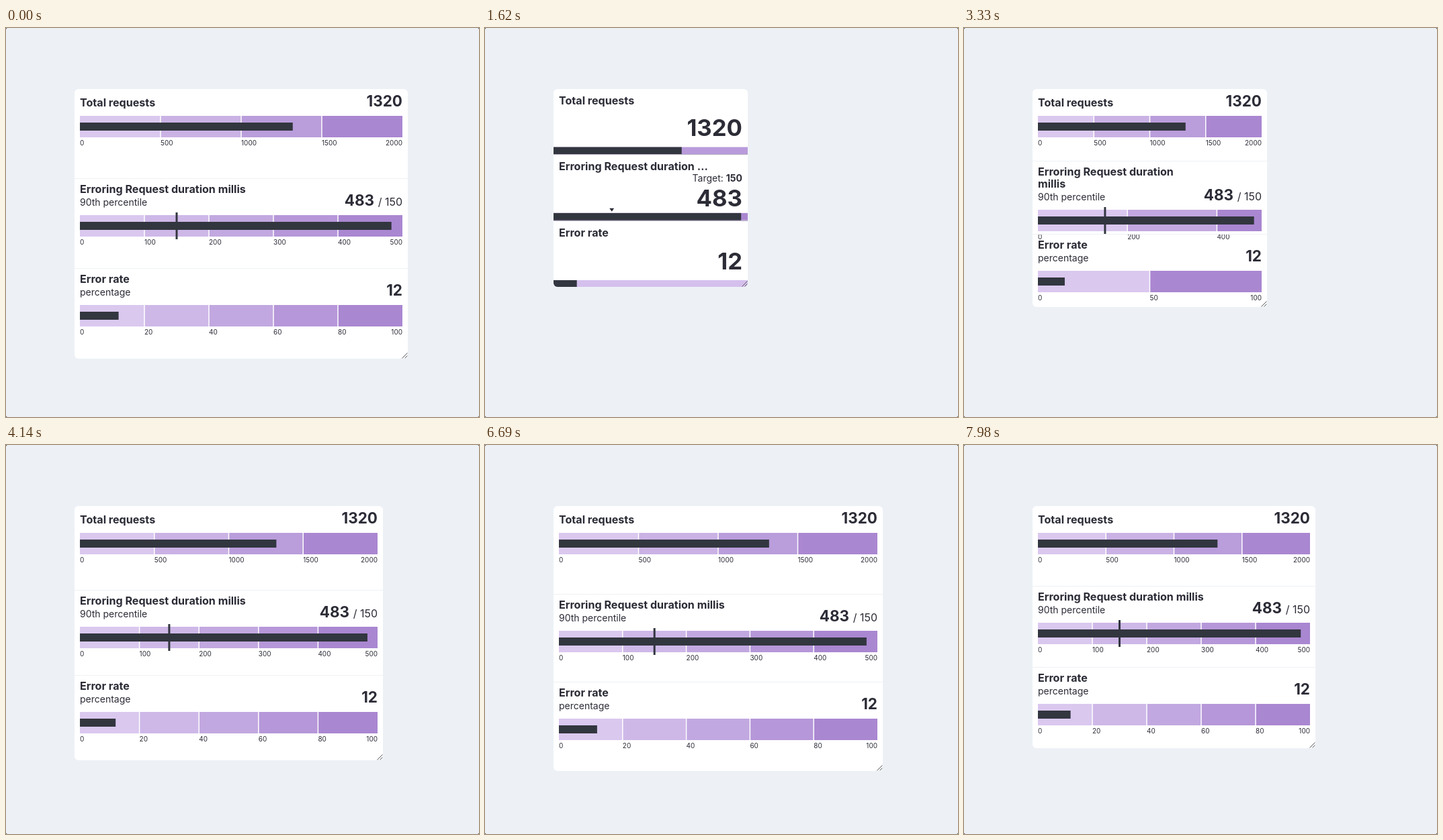
An HTML page with a canvas that plays this animation: 704 by 580 pixels, repeating every 8000 ms.

```html
<!DOCTYPE html>
<html lang="en">
<head>
<meta charset="utf-8">
<title>Resizable bullet charts</title>
<style>
  html, body { margin: 0; width: 100%; height: 100%; overflow: hidden; background: #3a3c40; }
  canvas { display: block; }
</style>
</head>
<body>
<canvas id="stage" width="704" height="580"></canvas>
<script>
const ctx = document.getElementById('stage').getContext('2d');
const LOOP = 8000, STEP = 30;
const LEFT = 102, TOP = 91, PAD = 8;
const TITLE = 16.1;
const INK = '#2b2c36', BAR = '#32363f', LIGHT = [218, 200, 239], DARK = [170, 135, 209];

// Panel corner while it is dragged: time, right, bottom
const DRAG = [
  [510, 598, 493], [1320, 437, 411], [1620, 391, 386], [2070, 364, 373],
  [2910, 364, 373], [3330, 451, 416], [3720, 513, 447], [4140, 561, 470],
  [4530, 585, 482], [4680, 592, 486], [7050, 592, 486], [7380, 578, 479],
  [7860, 534, 457], [7980, 523, 452]
];

const CHARTS = [
  { lines: ['Total requests'], value: 1320, max: 2000, rest: '#b99bdc' },
  { lines: ['Erroring Request duration', 'millis'], sub: '90th percentile',
    value: 483, target: 150, max: 500, rest: '#a987d0' },
  { lines: ['Error rate'], sub: 'percentage', value: 12, max: 100, rest: '#d5c0ed' }
];

const secant = (i, k) => (DRAG[i + 1][k] - DRAG[i][k]) / (DRAG[i + 1][0] - DRAG[i][0]);

function tangent(i, k) {
  if (i === 0) return 0;
  if (i === DRAG.length - 1) return secant(i - 1, k);
  const a = secant(i - 1, k), b = secant(i, k);
  return a * b > 0 ? 2 * a * b / (a + b) : 0;
}

// Monotone cubic interpolation between drag points
function dragAt(t, k) {
  const last = DRAG.length - 1;
  if (t <= DRAG[0][0]) return DRAG[0][k];
  if (t >= DRAG[last][0]) return DRAG[last][k];
  const i = DRAG.findIndex(p => p[0] > t) - 1;
  const span = DRAG[i + 1][0] - DRAG[i][0], u = (t - DRAG[i][0]) / span, v = 1 - u;
  return DRAG[i][k] * (1 + 2 * u) * v * v + DRAG[i + 1][k] * u * u * (3 - 2 * u)
    + span * u * v * (tangent(i, k) * v - tangent(i + 1, k) * u);
}

function rect(x, y, w, h, color) {
  ctx.fillStyle = color;
  ctx.fillRect(x, y, w, h);
}

function roundRect(x, y, w, h, r, color) {
  ctx.beginPath();
  ctx.roundRect(x, y, w, h, r);
  ctx.fillStyle = color;
  ctx.fill();
}

// Draws text and returns its width
function text(str, x, y, size, weight = 400, align = 'left') {
  ctx.font = `${weight} ${size}px Inter, sans-serif`;
  ctx.textAlign = align;
  ctx.fillStyle = INK;
  ctx.fillText(str, x, y);
  return ctx.measureText(str).width;
}

function tickStep(max, count) {
  const raw = max / count, power = 10 ** Math.floor(Math.log10(raw)), error = raw / power;
  return power * (error >= Math.sqrt(50) ? 10 : error >= Math.sqrt(10) ? 5 : error >= Math.SQRT2 ? 2 : 1);
}

function bandColor(u) {
  return `rgb(${LIGHT.map((c, i) => Math.round(c + (DARK[i] - c) * u))})`;
}

function drawBullet(chart, top, right) {
  const x = LEFT + PAD, end = right - PAD, width = end - x;
  const scale = v => x + v / chart.max * width;
  const lines = chart.target && width < 341 ? chart.lines : [chart.lines.join(' ')];
  let base = top + (chart.sub ? 21 : 25.5);

  lines.forEach((line, i) => {
    if (i) base += 17.6;
    text(line, x, base, TITLE, 700);
  });
  if (chart.sub) text(chart.sub, x, base += 19, 14);
  const goal = chart.target ? 1 + text(` / ${chart.target}`, end, base, 16, 400, 'right') : 0;
  text(chart.value, end - goal, base, 22.5, 700, 'right');

  const y = Math.round(base + 14);
  const step = tickStep(chart.max, Math.floor(width / 100));
  const bands = Math.ceil(chart.max / step);
  for (let i = 0; i < bands; i++) {
    const from = scale(i * step), to = scale(Math.min((i + 1) * step, chart.max));
    rect(from, y, to - from, 32, bandColor(i / (bands - 1)));
    if (i) rect(from - 0.75, y, 1.5, 32, '#fff');
  }
  for (let v = 0; v <= chart.max; v += step) {
    text(v, scale(v), y + 43.6, 10, 400, v === chart.max ? 'right' : 'left');
  }
  rect(x, y + 10, scale(chart.value) - x, 12, BAR);
  if (chart.target) rect(scale(chart.target) - 1.5, y - 4, 3, 40, BAR);
}

function drawMetric(chart, top, bottom, right, isLast) {
  const width = right - LEFT, end = right - PAD;
  const y = bottom - (isLast ? 10 : 11.8), height = isLast ? 10 : 10.8;
  text(chart.lines[0] + (chart.lines[1] ? ' …' : ''), LEFT + PAD, top + 23, TITLE, 700);
  text(chart.value, end, y - (chart.target ? 10 : 16.5), 34.7, 700, 'right');
  rect(LEFT, y, width, height, chart.rest);
  rect(LEFT, y, width * chart.value / chart.max, height, BAR);

  if (chart.target) {
    const goal = text(chart.target, end, y - 46.5, 14, 700, 'right');
    text('Target: ', end - goal, y - 46.5, 14, 400, 'right');
    const x = LEFT + width * chart.target / chart.max;
    ctx.beginPath();
    ctx.moveTo(x - 3.5, y - 7);
    ctx.lineTo(x + 3.5, y - 7);
    ctx.lineTo(x, y - 2);
    ctx.fill();
  }
}

function drawHandle(right, bottom) {
  ctx.beginPath();
  for (const size of [8, 4]) {
    ctx.moveTo(right - size - 0.5, bottom - 0.5);
    ctx.lineTo(right - 0.5, bottom - size - 0.5);
  }
  ctx.strokeStyle = '#55575c';
  ctx.lineWidth = 1;
  ctx.stroke();
}

function draw(time) {
  const t = time - time % STEP;
  const right = Math.round(dragAt(t, 1)), bottom = Math.round(dragAt(t, 2));
  const rowHeight = (bottom - TOP) / CHARTS.length, compact = right < 420;

  rect(0, 0, 704, 580, '#3a3c40');
  roundRect(0, 0, 704, 580, 2.5, '#edf1f6');
  ctx.save();
  roundRect(LEFT, TOP, right - LEFT, bottom - TOP, 6, '#fff');
  ctx.clip();
  CHARTS.forEach((chart, i) => {
    const top = TOP + i * rowHeight;
    if (i) rect(LEFT, Math.round(top) - 1, right - LEFT, 1, compact ? '#b4aebf' : '#eef1f5');
    if (compact) drawMetric(chart, top, top + rowHeight, right, i === CHARTS.length - 1);
    else drawBullet(chart, top, right);
  });
  drawHandle(right, bottom);
  ctx.restore();
}

function frame() {
  draw(performance.now() % LOOP);
  requestAnimationFrame(frame);
}
frame();
</script>
</body>
</html>
```
